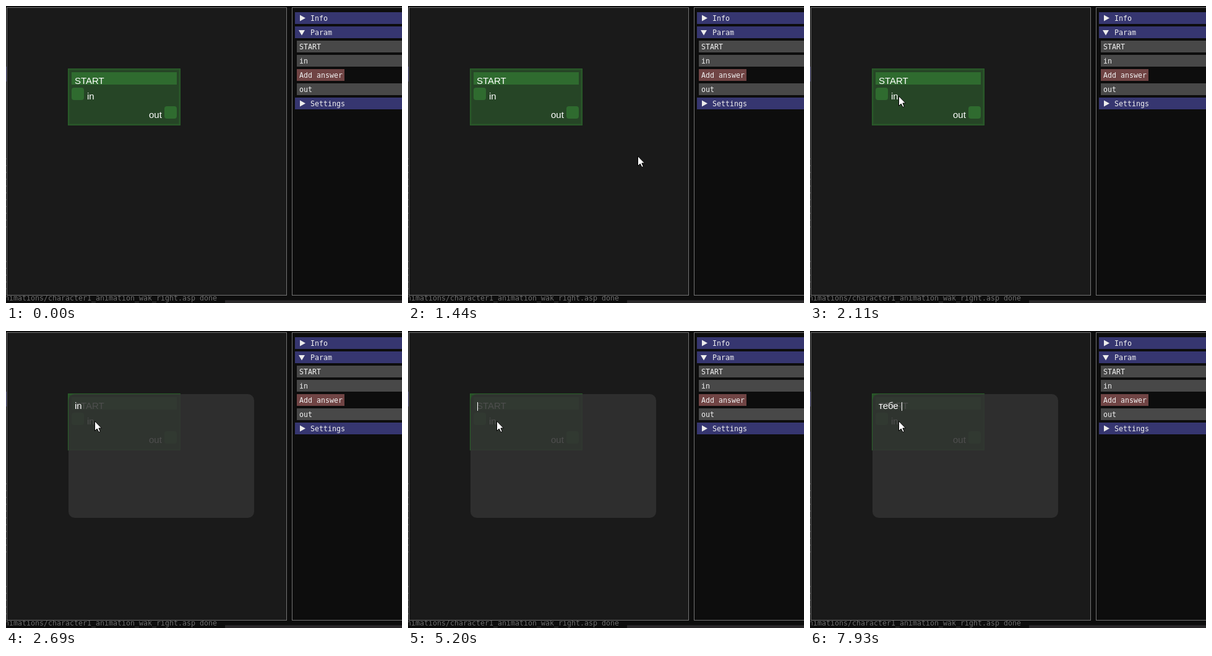
Animation of 640x480 px, one loop 8 s. Source, as an HTML page:

```html
<!DOCTYPE html>
<html lang="en">
<head>
<meta charset="utf-8">
<title>Node editor</title>
<style>
  html, body { margin: 0; width: 100%; height: 100%; overflow: hidden; background: #0d0d0d; }
  svg, .modal, .typed, .caret { position: absolute; left: 0; top: 0; }
  svg { display: block; }

  .ui { font: 11.63px "DejaVu Sans Mono", monospace; fill: #f0f0f0; white-space: pre; }
  .node-text, .typed { font: 15px/17px "Liberation Sans", Arial, sans-serif; }
  .node-text { fill: #fff; }
  .bar { fill: #363670; }
  .field { fill: #484848; }
  .pane { stroke: #747474; }
  .accent { fill: #2f6b2f; }

  .modal, .typed::before, .caret, .pointer { animation: 8s step-end infinite; }

  .modal {
    left: 101px; top: 102px; width: 300px; height: 200px;
    border-radius: 10px; background: rgba(50, 50, 50, .86);
    animation-name: open;
  }
  .typed { left: 111px; top: 112px; color: #fff; white-space: pre; }
  .typed::before { content: ""; animation-name: type; }
  .caret {
    top: 115px; width: 1px; height: 14px; background: #fff;
    animation-name: caret;
  }
  .pointer { animation-name: point; }

  @keyframes open {
    0% { visibility: hidden; }
    33.625%, 100% { visibility: visible; }
  }

  @keyframes type {
    0% { content: ""; }
    33.625% { content: "in"; }
    49.375% { content: "i"; }
    52.25% { content: ""; }
    66.375% { content: "n"; }
    74% { content: ""; }
    85.125% { content: "т"; }
    88.5% { content: "те"; }
    90.5% { content: "теб"; }
    91.5% { content: "тебе"; }
    99.125%, 100% { content: "тебе "; }
  }

  @keyframes caret {
    0% { left: 123px; opacity: 0; }
    39.875% { left: 123px; opacity: 1; }
    49.375% { left: 115px; opacity: 1; }
    52.25% { left: 112px; opacity: 0; }
    65% { left: 112px; opacity: 1; }
    66.375% { left: 120px; opacity: 1; }
    74% { left: 112px; opacity: 1; }
    77.25% { left: 112px; opacity: 0; }
    89.75% { left: 127px; opacity: 1; }
    90.5% { left: 136px; opacity: 1; }
    91.5% { left: 144px; opacity: 1; }
    99.125%, 100% { left: 148px; opacity: 1; }
  }

  /* The pointer is sampled at a low rate, so each stretch moves in steps. */
  @keyframes point {
    0% { transform: translate(640px, 312px); }
    12% { transform: translate(628px, 312px); }
    12.625% { transform: translate(556px, 301px); animation-timing-function: steps(3); }
    13.75% { transform: translate(421px, 279px); }
    16.125% { transform: translate(440px, 293px); }
    16.625% { transform: translate(451px, 302px); animation-timing-function: steps(3); }
    18% { transform: translate(371px, 242px); animation-timing-function: steps(5); }
    20.25% { transform: translate(236px, 168px); animation-timing-function: steps(5); }
    22.625% { transform: translate(171px, 137px); }
    25.875% { transform: translate(155px, 142px); }
    26.375%, 100% { transform: translate(143px, 145px); }
  }
</style>
</head>
<body>
<svg width="640" height="480" viewBox="0 0 640 480">
  <rect width="640" height="480" fill="#0d0d0d"/>
  <path d="M0 98h1v24h-1z" fill="#2b2b58"/>
  <path d="M.5 246V362M.5 412V460" stroke="#333" stroke-dasharray="2 9"/>
  <path d="M354 475.5H640V480H354z" fill="#2b292b"/>
  <text class="ui" x="-2" y="476" style="fill:#6c6c6c">nimations/character1_animation_wak_right.asp done</text>

  <rect class="pane" x="1.5" y="2.5" width="452" height="465" fill="#1a1a1a"/>
  <rect class="pane" x="462.5" y="2.5" width="200" height="465" fill="#0d0d0d"/>

  <path class="bar" d="M467 10h173v19h-173zM467 33h173v19h-173zM467 148h173v19h-173z"/>
  <path class="field" d="M470 56h170v19h-170zM470 79h170v19h-170zM470 125h170v19h-170z"/>
  <rect x="470" y="102" width="77" height="19" fill="#704444"/>
  <path d="M475 14.5l9 5-9 5zM473 39h10l-5 8.5zM475 152.5l9 5-9 5z" fill="#ececec"/>
  <g class="ui">
    <text x="492" y="24">Info</text>
    <text x="492" y="47">Param</text>
    <text x="474" y="70">START</text>
    <text x="474" y="93">in</text>
    <text x="474" y="116">Add answer</text>
    <text x="474" y="139">out</text>
    <text x="492" y="162">Settings</text>
  </g>

  <rect x="100.5" y="101.5" width="181" height="91" fill="#264526" stroke="#2a632a"/>
  <rect x="102" y="103" width="178" height="88" fill="none" stroke="#285028" stroke-width="2"/>
  <g class="accent">
    <rect x="106" y="107" width="170" height="20"/>
    <rect x="106" y="132" width="20" height="20" rx="4"/>
    <rect x="256" y="162" width="20" height="20" rx="4"/>
  </g>
  <g class="node-text">
    <text x="111" y="126">START</text>
    <text x="131" y="151">in</text>
    <text x="231" y="181">out</text>
  </g>
</svg>

<div class="modal"></div>
<div class="typed"></div>
<div class="caret"></div>

<svg width="640" height="480" viewBox="0 0 640 480">
  <path class="pointer" d="M.5 .7V16.5L4.2 13 7 18.5 9.4 17.5 6.9 12H11.5z" fill="#fff" stroke="#000"/>
</svg>
</body>
</html>
```
